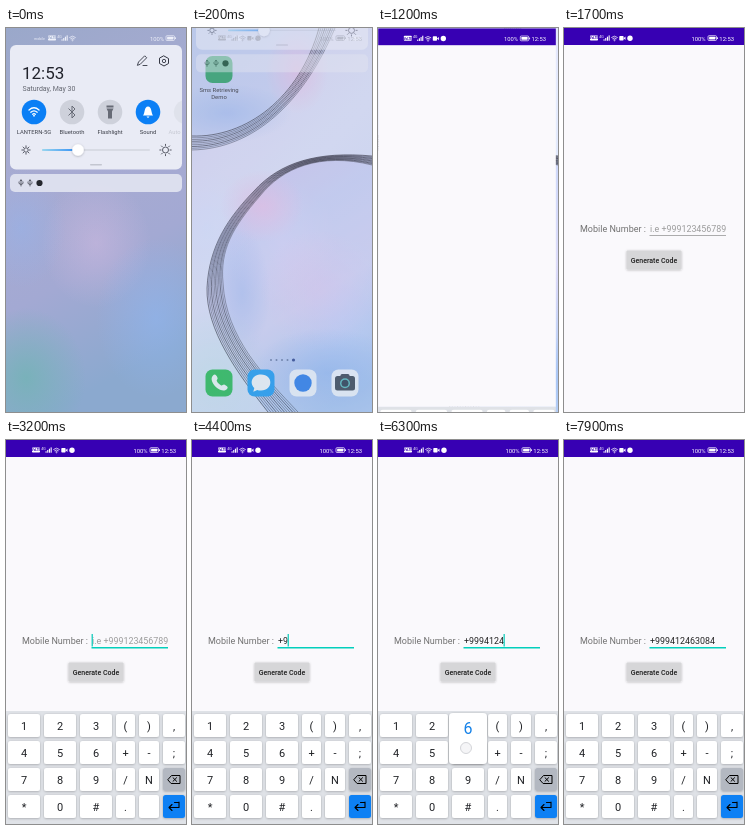
Animation, 180 px wide and 384 px high, one loop 8 s. Source, as an HTML page:

```html
<!DOCTYPE html>
<html lang="en">
<head>
<meta charset="utf-8">
<title>Code request demo</title>
<style>
  html, body { margin: 0; width: 100%; height: 100%; overflow: hidden; background: #faf9fc; }
  svg { display: block; width: 100vw; height: 100vh; font-family: Roboto, "Noto Sans", sans-serif; }
  .mid { text-anchor: middle; }
  .line { fill: none; stroke: currentColor; stroke-linecap: round; stroke-linejoin: round; }
</style>
</head>
<body>
<svg viewBox="0 0 180 384" preserveAspectRatio="none">
  <defs>
    <linearGradient id="sky" x2=".5" y2="1">
      <stop offset="0" stop-color="#cfdcf9"/><stop offset=".3" stop-color="#e3e4fb"/>
      <stop offset=".55" stop-color="#e4ebfd"/><stop offset="1" stop-color="#dbe5fb"/>
    </linearGradient>
    <linearGradient id="bubble" x1=".3" x2=".7" y2="1">
      <stop offset="0" stop-color="#d5cdf3"/><stop offset=".3" stop-color="#cfd9fa"/>
      <stop offset=".6" stop-color="#dcdcfa"/><stop offset="1" stop-color="#b3cdf6"/>
    </linearGradient>
    <linearGradient id="dusk" x2=".25" y2="1">
      <stop offset="0" stop-color="#9aa8ca"/><stop offset=".4" stop-color="#a8abd2"/>
      <stop offset=".7" stop-color="#a3a9d3"/><stop offset="1" stop-color="#8ba9cf"/>
    </linearGradient>
    <linearGradient id="level"><stop stop-color="#9ad6ef"/><stop offset="1" stop-color="#2f8df5"/></linearGradient>
    <radialGradient id="pink"><stop stop-color="#f3c6ea"/><stop offset="1" stop-color="#f3c6ea" stop-opacity="0"/></radialGradient>
    <radialGradient id="teal"><stop stop-color="#74b3b6"/><stop offset="1" stop-color="#74b3b6" stop-opacity="0"/></radialGradient>
    <radialGradient id="blue"><stop stop-color="#8fb6f3"/><stop offset="1" stop-color="#8fb6f3" stop-opacity="0"/></radialGradient>
    <filter id="lift" x="-20%" y="-20%" width="140%" height="150%">
      <feDropShadow dx="0" dy=".6" stdDeviation=".8" flood-opacity=".28"/>
    </filter>
  </defs>

  <g id="home"></g>
  <g id="homeStatus"></g>
  <g id="shade"></g>

  <g id="app">
    <rect width="180" height="384" fill="#faf9fc"/>
    <rect width="180" height="17" fill="#3700b3"/>
    <g id="appStatus" color="#fff"></g>
    <g id="form">
      <text x="16" y="204" font-size="9" fill="#737373">Mobile Number :</text>
      <text id="hint" x="86" y="204" font-size="8.9" fill="#9b9b9b">i.e +999123456789</text>
      <text id="entry" x="86" y="204" font-size="8.9" fill="#222"></text>
      <rect id="underline" x="85.5" width="76.5"/>
      <rect id="cursor" y="194" width="1.2" height="12.5" fill="#03c9b7"/>
      <rect x="62.5" y="222.5" width="55" height="19" rx="1" fill="#d6d6d8" filter="url(#lift)"/>
      <text class="mid" x="90" y="234.6" font-size="7" font-weight="500" fill="#1c1c1c">Generate Code</text>
    </g>
    <g id="keyboard"></g>
    <g id="popup">
      <rect id="popupBox" height="51" rx="4" fill="#fff" filter="url(#lift)"/>
      <text id="popupText" class="mid" font-size="16" fill="#1682e8"></text>
      <circle id="touch" r="5.5" fill="#f4f4f6" fill-opacity=".9" stroke="#c9cbd0" stroke-width=".8"/>
    </g>
  </g>
</svg>

<script>
const $ = id => document.getElementById(id);
const set = (id, attrs) => { for (const k in attrs) $(id).setAttribute(k, attrs[k]); };
const lerp = (a, b, p) => a + (b - a) * p;
const progress = (t, from, to) => Math.min(1, Math.max(0, (t - from) / (to - from)));
const easeOut = p => 1 - (1 - p) ** 3;
const list = (n, draw) => Array.from({ length: n }, (_, i) => draw(i)).join('');

const label = (x, y, size, text, extra = '') =>
  `<text class="mid" x="${x}" y="${y}" font-size="${size}" ${extra}>${text}</text>`;
const box = (x, y, w, h, r, fill, extra = '') =>
  `<rect x="${x}" y="${y}" width="${w}" height="${h}" rx="${r}" fill="${fill}" ${extra}/>`;
const disc = (x, y, r, fill, extra = '') => `<circle cx="${x}" cy="${y}" r="${r}" fill="${fill}" ${extra}/>`;
const stroke = (d, width = 1, extra = '') => `<path class="line" d="${d}" stroke-width="${width}" ${extra}/>`;
const glow = (x, y, rx, ry, id, opacity) =>
  `<ellipse cx="${x}" cy="${y}" rx="${rx}" ry="${ry}" fill="url(#${id})" opacity="${opacity}"/>`;

const wifi = (x, y, s) => `<g transform="translate(${x} ${y}) scale(${s})">` +
  stroke('M-5-2.5Q0-7 5-2.5M-3.2-.3Q0-3 3.2-.3M-1.4 1.7Q0 .6 1.4 1.7', 1.3) +
  disc(0, 3.2, .9, 'currentColor') + '</g>';

const battery = x => box(x, 7.7, 8.5, 4.8, 1, 'none', 'stroke="currentColor" stroke-width=".7"') +
  box(x + 1.1, 8.8, 6.3, 2.6, .4, 'currentColor') + box(x + 9, 9.2, .9, 1.8, .3, 'currentColor');

const signals = (x, badgeText) => box(x, 7.5, 8, 5, .8, 'currentColor') +
  label(x + 4, 11.3, 3, 'VoLTE', `font-weight="700" fill="${badgeText}"`) +
  label(x + 11.5, 9.8, 3.6, '4G', 'fill="currentColor"') +
  list(4, i => box(x + 13.5 + i * 1.7, 11.3 - i * 1.3, 1.1, 1.4 + i * 1.3, 0, 'currentColor')) +
  wifi(x + 24.5, 10.8, .58);

const statusBar = badgeText => signals(26, badgeText) +
  box(55.3, 8, 4.3, 4.5, .8, 'currentColor') + '<path d="M59.5 10.2l2-1.6v3.3z" fill="currentColor"/>' +
  disc(66, 10.2, 2.7, 'currentColor') +
  label(134.5, 12.5, 5.9, '100%', 'fill="currentColor"') + battery(144) +
  label(162.7, 12.5, 5.9, '12:53', 'fill="currentColor"');

// Wallpaper: bundles of lines blended between two edge curves.
const curve = n => `M${n.slice(0, 2)}` + list((n.length - 2) / 6, i => `C${n.slice(2 + i * 6, 8 + i * 6)}`);
const ribbon = (a, b, count) => list(count, i => {
  const p = i / (count - 1);
  const shade = i % 3 ? '#8195c4' : '#536795';
  return stroke(curve(a.map((v, k) => lerp(v, b[k], p))), i % 3 ? .55 : .8, `stroke="${shade}" opacity=".72"`);
});
const upper = [[0, 108, 54, 110, 108, 70, 127, 0], [0, 122, 62, 121, 112, 74, 143, 0]];
const lower = [
  [180, 128, 126, 123, 88, 134, 62, 163, 36, 190, 17, 218, 15, 260, 14, 302, 45, 345, 76, 384],
  [180, 137, 128, 124, 90, 140, 68, 168, 40, 200, 28, 222, 31, 255, 34, 310, 72, 348, 106, 384]
];

const wallpaper = box(0, 0, 180, 384, 0, 'url(#sky)') +
  `<path d="${curve(upper[1])}H0z" fill="#c6d5f8" opacity=".7"/>` +
  glow(105, 42, 32, 44, 'pink', .8) + glow(35, 85, 65, 30, 'blue', .5) +
  `<path d="${curve(lower[0])}H180z" fill="url(#bubble)"/>` +
  glow(70, 178, 42, 36, 'pink', .75) + glow(128, 262, 60, 60, 'pink', .4) +
  glow(135, 345, 75, 45, 'blue', .65) + glow(50, 265, 28, 65, 'blue', .4) +
  ribbon(...upper, 9) + ribbon(...lower, 12);

const tile = (x, y, fill) => box(x - 13.5, y - 13.5, 27, 27, 7, fill);
$('home').innerHTML = wallpaper + tile(27, 41.5, '#22a45e') +
  label(27, 64, 5.9, 'Sms Retrieving', 'fill="#222"') + label(27, 71, 5.9, 'Demo', 'fill="#222"') +
  list(4, i => disc(79 + i * 5.5, 332, 1, '#65779f')) + disc(101.5, 332, 1.6, '#263c87') +
  tile(27, 355, '#24bd4d') +
  '<path d="M21 347.5c2-2 3.3-.3 4.5 2.2.7 1.5-1.3 2.3-.7 3.4 1 2 2.5 3.5 4.4 4.4 1.200.5 1.900-1.500 3.400-.8 2.500 1.200 4.200 2.500 2.200 4.500-6 5.500-19.500-8-13.800-13.700z" fill="#fff"/>' +
  tile(69, 355, '#149cf8') +
  '<path d="M69 346.500c12.500 0 12.500 16 0 16q-2.500 0-3.700-.5l-4 1.700 1-3.700c-5.500-5.500-1.800-13.500 6.700-13.500z" fill="#fff"/>' +
  tile(111, 355, '#fbfcff') + disc(111, 355, 8.700, '#2379ee') +
  tile(153, 355, '#fbfcff') + box(148.500, 346, 9, 5, 1.500, '#343b44') + box(143, 348, 20, 14.500, 2.500, '#343b44') +
  disc(153, 355.200, 5, '#55bdb9') + disc(153, 355.200, 3.500, '#20303d');

$('homeStatus').innerHTML = statusBar('#dce6fb');
$('homeStatus').setAttribute('color', '#3c4254');
$('appStatus').innerHTML = statusBar('#3700b3');

// Quick settings shade.
const rays = (x, y, r) => disc(x, y, r, 'none', 'stroke="currentColor" stroke-width=".8"') + list(8, i => {
  const c = Math.cos(i * Math.PI / 4), s = Math.sin(i * Math.PI / 4);
  return stroke(`M${x + c * r * 1.5} ${y + s * r * 1.5}L${x + c * r * 1.9} ${y + s * r * 1.9}`, .8);
});
const toggles = [
  ['LANTERN-5G', true, wifi(28, 84.5, 1)],
  ['Bluetooth', false, stroke('M62.800 80.800L69 87 66 90V78l3 3-6.200 6.200', 1)],
  ['Flashlight', false, '<path d="M100.500 77.500h7v2h-7zM100.500 80.500h7l-1.500 3v7h-4v-7z" fill="currentColor"/>'],
  ['Sound', true, '<path d="M137 87.500c2-2 1-9 5-9s3 7 5 9zM140.500 88.500h3q-1.500 2.500-3 0z" fill="currentColor"/>'],
];
const usb = x => stroke(`M${x} 158v-6m-1 1l1-1.200 1 1.200M${x - 2} 154v1.500l2 1 2-1V154`, .7);

$('shade').innerHTML = `<g id="backdrop">${box(0, 0, 180, 384, 0, 'url(#dusk)')}` +
  glow(20, 350, 60, 70, 'teal', .85) + glow(90, 215, 55, 65, 'pink', .3) +
  glow(150, 290, 60, 80, 'blue', .55) + glow(15, 200, 45, 60, 'blue', .4) +
  `<g color="#eef0fa">${label(33.500, 12, 3.600, 'mobile', 'fill="currentColor"')}${signals(42, '#9aa8ca')}` +
  label(151, 12.500, 5.900, '100%', 'fill="currentColor"') + battery(160) + '</g></g>' +
  '<g id="panel" color="#343743">' + box(4, 17, 172, 124.500, 6, '#e9ebf5') +
  box(4, 146, 172, 18, 5, '#e3e5f1', 'opacity=".9"') +
  '<text x="16" y="51" font-size="17" fill="#20222b">12:53</text>' +
  '<text x="16.500" y="63" font-size="7" fill="#62656f">Saturday, May 30</text>' +
  stroke('M131.500 37l1-3 6.200-6.200 2 2-6.200 6.200zM137 37.500h4', .9) +
  stroke('M158 28l4.500 2.500v5L158 38l-4.500-2.500v-5z', 1) + disc(158, 33, 1.700, 'none', 'stroke="currentColor" stroke-width=".9"') +
  toggles.map(([name, on, icon], i) => disc(28 + i * 38, 84, 12.300, on ? '#0b7ff5' : '#ced1db') +
    `<g color="${on ? '#fff' : '#676b76'}">${icon}</g>` +
    label(28 + i * 38, 106, 5.800, name, 'fill="#3a3d47"')).join('') +
  '<path d="M176 72.400a12.300 12.300 0 0 0 0 23.200z" fill="#dfe2eb"/>' +
  '<text x="162.500" y="106" font-size="5.800" fill="#c5c8d2">Auto</text>' +
  rays(20, 122, 2.200) + rays(159.500, 122, 3) +
  box(36, 121.300, 108, 1.400, .7, '#d3d6e0') + box(36, 121.100, 36, 1.800, .9, 'url(#level)') +
  disc(72, 122, 5.800, '#fff', 'filter="url(#lift)"') + box(84, 136, 12, 1.500, .7, '#c3c6d0') +
  usb(15) + usb(24) + disc(33.500, 155, 3.100, '#25272e') + '</g>';

// Keyboard.
const columns = [[2, 32], [38, 32], [74, 32], [110, 19], [133, 20], [157, 22]];
const rows = ['123(),', '456+-;', '789/N<', '*0#. >'];
const keys = {};
let keyboard = box(0, 271, 180, 113, 0, '#dfe2e7');
rows.forEach((row, r) => [...row].forEach((char, c) => {
  const [x, w] = columns[c], y = 274 + r * 27, mid = x + w / 2;
  keys[char] = { mid, w, y };
  const fill = { '<': '#b3b8c1', '>': '#0b80f4' }[char] || '#fff';
  keyboard += box(x, y, w, 23, 2.500, fill, 'filter="url(#lift)"');
  if (char === '<') keyboard += stroke(`M${mid - 6} ${y + 11.500}l3.500-4h8.500v8h-8.500zm5-1.800l3.600 3.600m0-3.600l-3.600 3.600`, 1, 'stroke="#30343b"');
  else if (char === '>') keyboard += stroke(`M${mid + 5} ${y + 7}v5.500h-10m3-3l-3 3 3 3m2.500-8h4.500`, 1.100, 'stroke="#fff"');
  else keyboard += label(mid, y + 15.500, 11, char, 'fill="#202226"');
}));
$('keyboard').innerHTML = keyboard;

const number = '+999412463084';
const presses = [3800, 4200, 4500, 4800, 5050, 5300, 5600, 5900, 6200, 6500, 6750, 7050, 7200];
const hold = 180, focusAt = 2900, loop = 8000;

function drawShade(t) {
  const p = easeOut(progress(t, 0, 600));
  set('shade', { visibility: p < 1 ? 'visible' : 'hidden' });
  set('backdrop', { opacity: 1 - p });
  set('panel', { transform: `translate(0 ${-170 * p})`, opacity: 1 - p * p });
  set('homeStatus', { opacity: p });
}

function drawApp(t) {
  const p = easeOut(progress(t, 900, 1300));
  set('app', {
    visibility: p > 0 ? 'visible' : 'hidden',
    opacity: Math.min(1, p * 1.300),
    transform: `translate(${13.500 * (1 - p)} ${28 * (1 - p)}) scale(${lerp(.15, 1, p)} ${lerp(.07, 1, p)})`
  });
  set('form', { opacity: progress(t, 1400, 1700) });
  set('keyboard', { transform: `translate(0 ${113 * (1 - easeOut(progress(t, 2700, 3200)))})` });
}

function drawEntry(t) {
  const count = presses.filter(at => t >= at + hold).length;
  const focused = t >= focusAt;
  const lastEdit = count ? presses[count - 1] + hold : focusAt;
  const blinkOn = Math.floor((t - lastEdit) / 500) % 2 === 0;
  $('entry').textContent = number.slice(0, count);
  set('hint', { opacity: count ? 0 : 1 });
  set('underline', focused ? { y: 207, height: 1.500, fill: '#03cfbc' } : { y: 207, height: .7, fill: '#8b8b8b' });
  set('cursor', {
    x: 85.600 + (count ? $('entry').getComputedTextLength() : 0),
    opacity: focused && blinkOn ? 1 : 0
  });
}

function drawPopup(t) {
  const index = presses.findLastIndex(at => t >= at && t < at + hold);
  set('popup', { opacity: index < 0 ? 0 : 1 });
  if (index < 0) return;
  const { mid, w, y } = keys[number[index]];
  $('popupText').textContent = number[index];
  set('popupBox', { x: mid - w / 2 - 3, y: y - 28, width: w + 6 });
  set('popupText', { x: mid, y: y - 7 });
  set('touch', { cx: mid - 2, cy: y + 7 });
}

function draw(now) {
  const t = Math.floor((now % loop) / 100) * 100;
  drawShade(t);
  drawApp(t);
  drawEntry(t);
  drawPopup(t);
}

const start = performance.now();
function tick() {
  draw(performance.now() - start);
  requestAnimationFrame(tick);
}
tick();
</script>
</body>
</html>
```
